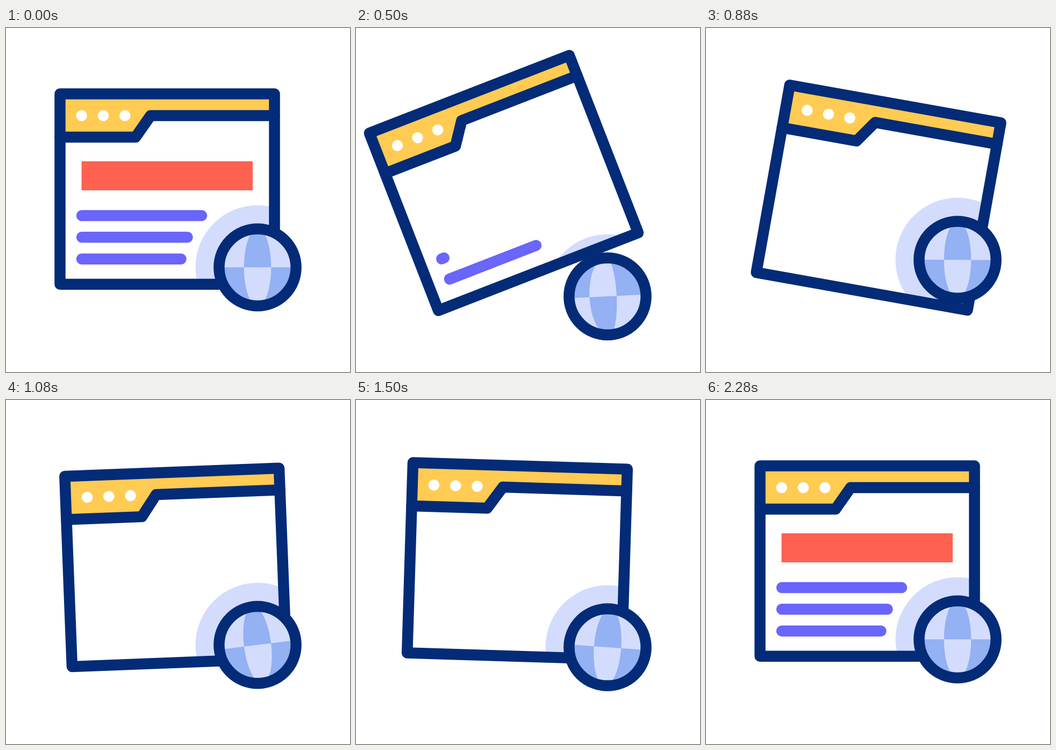
These frames come from a looping animation (640x640 px, 2400 ms). An HTML page with a canvas:

```html
<!DOCTYPE html>
<html>
<head>
<meta charset="utf-8">
<style>
  html, body { margin: 0; height: 100%; overflow: hidden; background: #fff; }
  canvas { display: block; width: 640px; height: 640px; }
</style>
</head>
<body>
<canvas id="stage" width="640" height="640"></canvas>
<script>
const ctx = document.getElementById('stage').getContext('2d');
const LOOP = 2400, TURN = 2 * Math.PI, DEG = Math.PI / 180;
const NAVY = '#032b77', YELLOW = '#ffcb52', RED = '#ff6150';
const PURPLE = '#6a65fb', PALE = '#d3dcfd', BLUE = '#93b1f3';
const LINE_LENGTHS = [223, 196.5, 184.5];
const STRIPE = 50.6;

const clamp = p => Math.min(1, Math.max(0, p));
const sine = p => (1 - Math.cos(Math.PI * clamp(p))) / 2;
const cubic = p => p < 0.5 ? 4 * p ** 3 : 1 - 4 * (1 - clamp(p)) ** 3;

// Adds up eased steps between values reached at the given times.
const follow = (t, times, values) => times.slice(1).reduce((sum, end, i) =>
  sum + (values[i + 1] - values[i]) * sine((t - times[i]) / (end - times[i])), values[0]);

// Swings to alternating, shrinking peaks and comes to rest at the last time.
const swing = (t, times, peak, decay) => follow(t, times, times.map((_, i) =>
  i === 0 || i === times.length - 1 ? 0 : peak * (-decay) ** (i - 1)));

// Goes from 1 to 0, then back to 1.
const hideAndShow = (t, out, outTime, back, backTime) =>
  1 - sine((t - out) / outTime) + sine((t - back) / backTime);

function trace(points, close) {
  ctx.beginPath();
  points.forEach(([x, y]) => ctx.lineTo(x, y));
  if (close) ctx.closePath();
}

function stroke(color) {
  ctx.strokeStyle = color;
  ctx.lineWidth = 20.5;
  ctx.stroke();
}

function disc(x, y, r, color) {
  ctx.beginPath();
  ctx.arc(x, y, r, 0, TURN);
  ctx.fillStyle = color;
  ctx.fill();
}

function drawWindow(t, globeY) {
  const tab = [[100.5, 203], [241, 203], [269, 163], [499.5, 163]];
  const times = [0, 460, 878, 1470];
  ctx.save();
  ctx.translate(300 + follow(t, times, [0, -26, 21, 0]), 300 + follow(t, times, [0, -12, 16, 0]));
  ctx.rotate(swing(t, [0, 460, 878, 1155, 1450, 1630], -22, 0.46) * DEG);
  ctx.translate(-300, -300);

  // The halo follows the globe but shows only inside the window.
  ctx.save();
  ctx.beginPath();
  ctx.rect(100, 122, 400, 355);
  ctx.clip();
  ctx.setTransform(1, 0, 0, 1, 0, 0);
  disc(468, globeY, 115.5, PALE);
  ctx.restore();

  trace([...tab, [499.5, 122.5], [100.5, 122.5]], true);
  ctx.fillStyle = YELLOW;
  ctx.fill();
  for (let i = 0; i < 3; i++) disc(140.7 + 40.3 * i, 163, 10.3, '#fff');

  const scale = hideAndShow(t, 0, 300, 1690, 580);
  ctx.fillStyle = RED;
  ctx.fillRect(140.5, 302 - 54 * scale, 318.5 * scale, 54 * scale);

  LINE_LENGTHS.forEach((length, i) => {
    const part = hideAndShow(t, 157 + 155 * i, 210, 1985 - 200 * i, 215);
    const y = 349 + 40.35 * i;
    if (part < 0.001) return;
    trace([[141, y], [141 + length * part, y]]);
    stroke(PURPLE);
  });

  trace(tab);
  stroke(NAVY);
  trace([[100.5, 122.5], [499.5, 122.5], [499.5, 476.7], [100.5, 476.7]], true);
  stroke(NAVY);
  ctx.restore();
}

function drawGlobe(t, y) {
  const slide = 4 * STRIPE * (cubic(t / 860) - 1);
  ctx.save();
  ctx.translate(468, y);
  disc(0, 0, 72, PALE);
  ctx.save();
  ctx.clip();
  ctx.rotate(swing(t, [0, 320, 680, 1040, 1400, 1800], -17, 0.66) * DEG);

  // Overlapping half ellipses, one per meridian, give the chequered pattern.
  ctx.beginPath();
  ctx.rect(-80, 0, 160, 80);
  for (let i = -3; i <= 6; i++) {
    const x = (i + 0.5) * STRIPE + slide;
    ctx.moveTo(0, -72);
    ctx.ellipse(0, 0, Math.abs(x), 72, 0, -TURN / 4, TURN / 4, x < 0);
    ctx.closePath();
  }
  ctx.fillStyle = BLUE;
  ctx.fill('evenodd');
  ctx.restore();

  ctx.beginPath();
  ctx.arc(0, 0, 71.6, 0, TURN);
  stroke(NAVY);
  ctx.restore();
}

function draw(t) {
  const globeY = 445.3 + follow(t, [0, 325, 545, 700, 1180, 1400, 1950], [0, 54, 54, -27, 14.5, 16, 0]);
  ctx.fillStyle = '#fff';
  ctx.fillRect(0, 0, 640, 640);
  ctx.lineCap = ctx.lineJoin = 'round';
  drawWindow(t, globeY);
  drawGlobe(t, globeY);
}

const start = performance.now();
function tick() {
  draw((performance.now() - start) % LOOP);
  requestAnimationFrame(tick);
}
tick();
</script>
</body>
</html>
```
